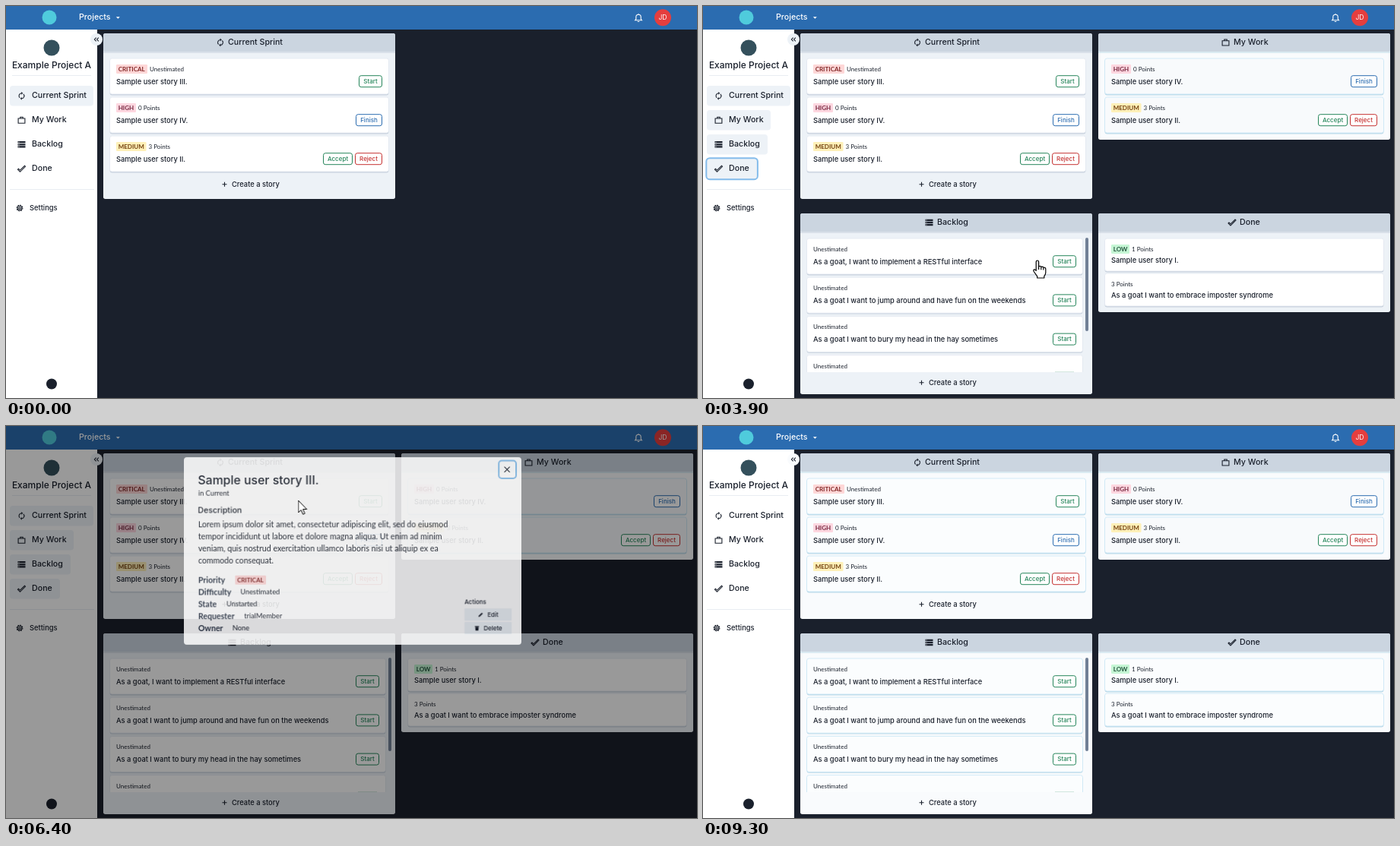
Write an HTML page that moves like this. It is 909 px wide and 516 px high and loops after 9.8 s.

```html
<!DOCTYPE html>
<html lang="en">
<head>
<meta charset="utf-8">
<title>Sprint board</title>
<style>
html, body { margin: 0; width: 100%; height: 100%; overflow: hidden; background: #1a202c; }
svg { display: block; }
text { font-family: Inter, "Open Sans", sans-serif; font-size: 9.33px; fill: #1a202c; white-space: pre; }
.lato { font-family: Lato, "Open Sans", sans-serif; }
.s8 { font-size: 8px; }
.s10 { font-size: 10.67px; }
.m { font-weight: 500; }
.b { font-weight: 700; }
.mid { text-anchor: middle; }
.ico { fill: none; stroke: #1a202c; stroke-width: 1.1; }
.body { fill: #edf2f7; }
.card { fill: #fff; stroke: #e2e8f0; stroke-width: .8; }
.shade { fill: #c6d0dc; }
.pale .body { fill: #f9fbfd; animation: none !important; }
.pale .card { fill: #f8fafc; stroke: #c9e6f5; animation: none !important; }
.pale .shade { fill: #bcd9e8; animation: none !important; }
.ring { fill: none; stroke: #4299e1; stroke-opacity: .65; stroke-width: 2; }
</style>
</head>
<body>
<svg id="stage" width="909" height="516" viewBox="0 0 909 516"></svg>
<script>
const LOOP = 9800;
let css = '';

// Stepped keyframes: each entry is [time in ms, declarations].
function steps(name, list) {
  css += `@keyframes ${name}{${list.map(([t, d]) => `${t / LOOP * 100}%{${d}}`).join('')}}`;
  return `style="animation:${name} ${LOOP}ms step-end infinite"`;
}
function showFrom(name, from, to = LOOP) {
  const list = [[0, 'opacity:0'], [from, 'opacity:1']];
  if (to < LOOP) list.push([to, 'opacity:0']);
  return steps(name, list);
}

const text = (x, y, s, cls = '', more = '') => `<text x="${x}" y="${y}" class="${cls}" ${more}>${s}</text>`;
const rect = (x, y, w, h, r, more) => `<rect x="${x}" y="${y}" width="${w}" height="${h}" rx="${r}" ${more}/>`;
const fill = c => `fill="${c}"`;

const syncHalf = '<path d="M-2.4 2.5A3.5 3.5 0 0 1 0-3.5"/><path d="M-.3-5.4V-1.6L1.8-3.5z" fill="#1a202c" stroke="none"/>';
const ICONS = {
  sync: `${syncHalf}<g transform="rotate(180)">${syncHalf}</g>`,
  work: '<path d="M-4.4-2.3H4.4V4H-4.4zM-1.7-2.3V-4H1.7V-2.3"/>',
  list: '<path d="M-5-3.1H5M-5 0H5M-5 3.1H5" stroke-width="2.3"/><path d="M-4-3.1h1M-4 0h1M-4 3.1h1" stroke="#fff" stroke-width=".8"/>',
  check: '<path d="M-5 .9L-4-.1-2 1.8 4-4 5-3-2 4z"/>',
  gear: '<circle r="1.3"/><circle r="3"/><circle r="3.9" stroke-dasharray="1.5 1.56"/>',
  plus: '<path d="M-3 0H3M0-3V3"/>',
  bell: '<path d="M-4.4 3.2H4.4L3.2 1.8V-1A3.2 3.2 0 0 0-3.2-1V1.8zM-1.2 5h2.4M0-5.4V-4" stroke="#fff"/>',
  fold: '<path d="M-.4-2.4L-2.6 0-.4 2.4M2.8-2.4L.6 0 2.8 2.4"/>',
  cross: '<path d="M-3.6-3.6L3.6 3.6M3.6-3.6L-3.6 3.6"/>',
  pencil: '<path d="M-3 3L-2.4 1 1.4-2.8 2.8-1.4-1 2.4z" fill="#1a202c" stroke="none"/>',
  bin: '<path d="M-2.3-1.6H2.3L1.9 3H-1.9zM-2.7-2.9H2.7V-2H-2.7z" fill="#1a202c" stroke="none"/>'
};
const icon = (name, x, y) => `<g class="ico" transform="translate(${x} ${y})">${ICONS[name]}</g>`;

const BADGES = {
  CRITICAL: [41, '#fed7d7', '#822727'],
  HIGH: [26, '#fed7e0', '#76263f'],
  MEDIUM: [39.5, '#fef0b8', '#744210'],
  LOW: [24, '#c6f6d5', '#22543d']
};
const BUTTONS = {
  Start: [31, '#25855a'],
  Finish: [35, '#2b6cb0'],
  Accept: [39, '#25855a'],
  Reject: [36, '#c53030']
};

function badge(x, y, name) {
  const [w, bg, ink] = BADGES[name];
  return rect(x, y, w, 12, 1.3, fill(bg)) + text(x + 2.7, y + 9, name, 'lato s8 b', `style="fill:${ink}"`);
}

function card(x, y, w, h, meta, title, mark, buttons = []) {
  let out = rect(x, y + 1.4, w, h, 3, `class="shade" ${shadeAnim}`) + rect(x, y, w, h, 3, `class="card" ${cardAnim}`);
  const left = x + 8.5;
  if (mark) out += badge(left, y + 8, mark);
  out += text(left + (mark ? BADGES[mark][0] + 3 : 0), y + 17, meta, 'lato s8');
  out += text(left, y + (h < 45 ? 32 : 34), title, 'm');
  let right = x + w - 8.5;
  for (const name of buttons) {
    const [bw, ink] = BUTTONS[name];
    out += rect(right - bw + .5, y + 22.7, bw - 1, 15, 2.7, `fill="#fff" stroke="${ink}"`);
    out += text(right - bw / 2, y + 33, name, 's8 m mid', `style="fill:${ink}"`);
    right -= bw + 3;
  }
  return out;
}

function panel(x, y, h, name, iconName, iconX, textX, content) {
  return rect(x, y, 384, h, 2.7, `class="body" ${bodyAnim}`)
    + rect(x, y + 22, 384, 4, 0, `class="shade" opacity=".5" ${shadeAnim}`)
    + rect(x, y, 384, 24, 2.7, fill('#cbd5e0'))
    + icon(iconName, iconX, y + 12) + text(textX, y + 15, name, 's10 m') + content;
}
const create = y => icon('plus', 287.5, y - 3.3) + text(297, y, 'Create a story', 'm');

const PALE_AT = 8700;
const bodyAnim = steps('body', [[0, 'fill:#edf2f7'], [PALE_AT, 'fill:#f9fbfd']]);
const cardAnim = steps('card', [[0, 'fill:#fff;stroke:#e2e8f0'], [PALE_AT, 'fill:#fbfdfe;stroke:#c9e6f5']]);
const shadeAnim = steps('shade', [[0, 'fill:#c6d0dc'], [PALE_AT, 'fill:#bcd9e8']]);

const PITCH = 51.2;
const sprint = panel(128, 36, 218, 'Current Sprint', 'sync', 282, 292,
  card(136.5, 69, 367, 47, 'Unestimated', 'Sample user story III.', 'CRITICAL', ['Start'])
  + card(136.5, 120, 367, 47, '0 Points', 'Sample user story IV.', 'HIGH', ['Finish'])
  + card(136.5, 171, 367, 47, '3 Points', 'Sample user story II.', 'MEDIUM', ['Reject', 'Accept'])
  + create(238));

const work = panel(520, 36, 140, 'My Work', 'work', 687.5, 698,
  card(528.5, 69, 367, 47, '0 Points', 'Sample user story IV.', 'HIGH', ['Finish'])
  + card(528.5, 120, 367, 47, '3 Points', 'Sample user story II.', 'MEDIUM', ['Reject', 'Accept']));

const wishes = [
  'As a goat, I want to implement a RESTful interface',
  'As a goat I want to jump around and have fun on the weekends',
  'As a goat I want to bury my head in the hay sometimes',
  'As a goat I want to climb the highest rocks',
  'As a goat I want to eat grass all day long'
];
const scroll = (name, dy) => steps(name, [[0, 'transform:none'], [4100, `transform:translateY(${dy}px)`], [4700, 'transform:none']]);
const backlog = panel(128, 273, 238, 'Backlog', 'list', 297.5, 308,
  `<g clip-path="url(#listClip)"><g ${scroll('list', -77)}>`
  + wishes.map((s, i) => card(136.5, 306 + i * PITCH, 363, 47, 'Unestimated', s, '', ['Start'])).join('')
  + `</g></g>${rect(503, 305, 4, 123, 2, `fill="#718096" ${scroll('thumb', 54)}`)}` + create(499));

const done = panel(520, 273, 130, 'Done', 'check', 696, 706,
  card(528.5, 306, 367, 43, '1 Points', 'Sample user story I.', 'LOW')
  + card(528.5, 352, 367, 43, '3 Points', 'As a goat I want to embrace imposter syndrome', ''));

// Sidebar entry: pill fills over time and the span of its focus ring.
function nav(id, y, w, label, iconName, fills, ring) {
  const pill = steps('pill' + id, fills.map(([t, c]) => [t, `fill:${c}`]));
  return rect(5, y, w, 26.5, 4, pill)
    + (ring ? rect(4.3, y - .8, w + 1.6, 28, 4.5, `class="ring" ${showFrom('ring' + id, ...ring)}`) : '')
    + icon(iconName, 20.5, y + 13.3) + text(34, y + 16.3, label, 's10 m');
}
const OFF = 'transparent', ON = '#edf2f7', DOWN = '#e2e8f0';
const sidebar = rect(0, 31, 120, 485, 0, fill('#fff'))
  + `<circle cx="119" cy="44" r="8" class="body" ${bodyAnim}/>` + icon('fold', 119, 44)
  + '<circle cx="60" cy="55" r="10.5" fill="#34505c"/>'
  + text(60, 82, 'Example Project A', 'm mid', 'style="font-size:12px"')
  + '<path d="M8 91.5H112M5 241.5H116" stroke="#e8edf2"/>'
  + nav('Sprint', 105, 110, 'Current Sprint', 'sync', [[0, ON], [PALE_AT, OFF]])
  + nav('Work', 137, 84, 'My Work', 'work', [[0, OFF], [1200, DOWN], [1300, ON], [PALE_AT, OFF]], [1200, 1700])
  + nav('Backlog', 169, 80, 'Backlog', 'list', [[0, OFF], [1600, ON], [1700, DOWN], [1800, ON], [PALE_AT, OFF]], [1700, 2200])
  + nav('Done', 201, 66, 'Done', 'check', [[0, OFF], [2000, ON], [2200, DOWN], [2300, ON], [PALE_AT, OFF]], [2200, 6100])
  + icon('gear', 18, 266) + text(31, 269.3, 'Settings', 'm')
  + '<circle cx="60" cy="497.5" r="7" fill="#1a202c"/>';

const topBar = rect(0, 0, 909, 31, 0, fill('#2b6cb0'))
  + '<circle cx="57" cy="15" r="9.5" fill="#4fcbdc"/>'
  + text(96, 18, 'Projects', 's10 m', 'style="fill:#fff"')
  + '<path d="M144.8 14.3h5l-2.5 2.5z" fill="#fff"/>' + icon('bell', 832, 15.5)
  + '<circle cx="864" cy="15.3" r="11" fill="#e53e3e"/>'
  + text(864, 18.3, 'JD', 'mid', 'style="fill:#fff;font-size:8.5px"');

const lorem = [
  'Lorem ipsum dolor sit amet, consectetur adipiscing elit, sed do eiusmod',
  'tempor incididunt ut labore et dolore magna aliqua. Ut enim ad minim',
  'veniam, quis nostrud exercitation ullamco laboris nisi ut aliquip ex ea',
  'commodo consequat.'
];
const facts = [
  ['Priority'],
  ['Difficulty', 307, 'Unestimated'],
  ['State', 288.5, 'Unstarted'],
  ['Requester', 312, 'trialMember'],
  ['Owner', 296.5, 'None']
];
const action = (y, iconName, iconX, textX, label) => rect(604.5, y, 62.5, 16.3, 1, fill('#edf2f7'))
  + icon(iconName, iconX, y + 8.5) + text(textX, y + 11, label, 's8 m');
const modal = rect(232, 40, 448, 249, 4, fill('#fff'))
  + text(250.5, 76, 'Sample user story III.', 'm', 'style="font-size:16px"')
  + text(251, 91, 'in Current', 'lato')
  + text(250.5, 114.3, 'Description', 's10 m')
  + lorem.map((s, i) => text(251, 132.7 + i * 16, s, 'lato s10')).join('')
  + facts.map(([k, x, v], i) => text(251, 207 + i * 16, k, 'lato s10 b', 'style="fill:#2d3748"')
    + (v ? text(x, 206 + i * 16, v, 'lato') : badge(300, 197, 'CRITICAL'))).join('')
  + text(604.5, 235, 'Actions', 's8 m')
  + action(240.7, 'pencil', 626, 635, 'Edit') + action(258.7, 'bin', 621, 630, 'Delete')
  + rect(650, 44.5, 23, 23.5, 4, 'class="ring"') + icon('cross', 661, 56.3);

const dimAnim = steps('dim', [[0, 'opacity:0'], [6400, 'opacity:.4'], [6500, 'opacity:.48'], [8700, 'opacity:0']]);
const modalAnim = steps('modal', [
  [0, 'opacity:0;transform:scale(.991)'], [6400, 'opacity:.85;transform:scale(.991)'],
  [6500, 'opacity:1;transform:none'], [8700, 'opacity:0;transform:none']
]).replace('style="', 'style="transform-origin:456px 164.5px;');

// Pointer: [time, x, y, is hand]
const path = [
  [600, 756, 11, 0], [700, 440, 52, 0], [800, 210, 82, 0], [900, 92, 91, 0], [1000, 57, 149, 1],
  [1400, 58, 158, 1], [1500, 57, 174, 1], [1600, 57, 185, 1], [1900, 50, 202, 1], [2000, 39, 212, 1],
  [3100, 54, 227, 0], [3200, 125, 272, 0], [3300, 230, 315, 1], [3400, 335, 331, 1], [3500, 420, 333, 1],
  [3600, 458, 333, 1], [3800, 449, 334, 1], [3900, 440, 335, 1],
  [5300, 438, 318, 1], [5400, 427, 268, 0], [5500, 414, 228, 1], [5600, 403, 189, 1], [5700, 396, 153, 1],
  [5800, 392, 125, 1], [5900, 384.5, 98, 1], [6400, 384.5, 98, 0],
  [7400, 433, 98, 0], [7500, 525, 97, 0], [7600, 605, 92, 0], [7700, 650, 80, 0], [7800, 664.5, 58, 1],
  [8700, 664.5, 58, 0], [9100, 700, 63, 0], [9200, 767, 70, 1]
];
const moveAnim = steps('move', [[0, 'opacity:0'],
  ...path.map(([t, x, y]) => [t, `opacity:1;transform:translate(${x}px,${y}px)`]), [9300, 'opacity:0']]);
const shape = (name, hand) => steps(name, [[0, 'opacity:0'], ...path.map(p => [p[0], `opacity:${+(p[3] === hand)}`])]);
const pointer = `<g ${moveAnim} fill="#fff" stroke="#000" stroke-linejoin="round">
  <path d="M0 0V16L3.7 12.5 6.2 18.3 8.6 17.2 6.2 11.6H11.2z" ${shape('arrow', 0)}/>
  <g ${shape('hand', 1)} stroke-width="1.2">
    <path d="M-1.8 13.4V1.7a1.7 1.7 0 0 1 3.4 0V8q1.7-1.2 3.2.4 1.8-.9 3 .7 2.8-.4 3 2V16q-.2 3-2 4.5V23H-.3V20.8L-4.8 14.5q-1-2 .6-2.6 1.2-.2 2.4 1.5z"/>
    <path d="M1.6 8v4M4.8 8.6v3.6M7.8 9.4v3" fill="none"/>
  </g></g>`;

document.getElementById('stage').innerHTML = `
  <clipPath id="listClip"><rect x="130" y="304" width="374" height="178"/></clipPath>
  ${rect(0, 0, 909, 516, 0, fill('#1a202c'))}
  ${topBar}${sprint}
  <g class="pale" ${showFrom('workPanel', 1300)}>${work}</g>
  <g ${showFrom('backlogPanel', 1800)}>${backlog}</g>
  <g ${showFrom('donePanel', 2300)}>${done}</g>
  ${sidebar}
  <rect width="909" height="516" ${dimAnim}/>
  <g ${modalAnim}>${modal}</g>
  ${pointer}`;
document.head.appendChild(document.createElement('style')).textContent = css;
</script>
</body>
</html>
```
